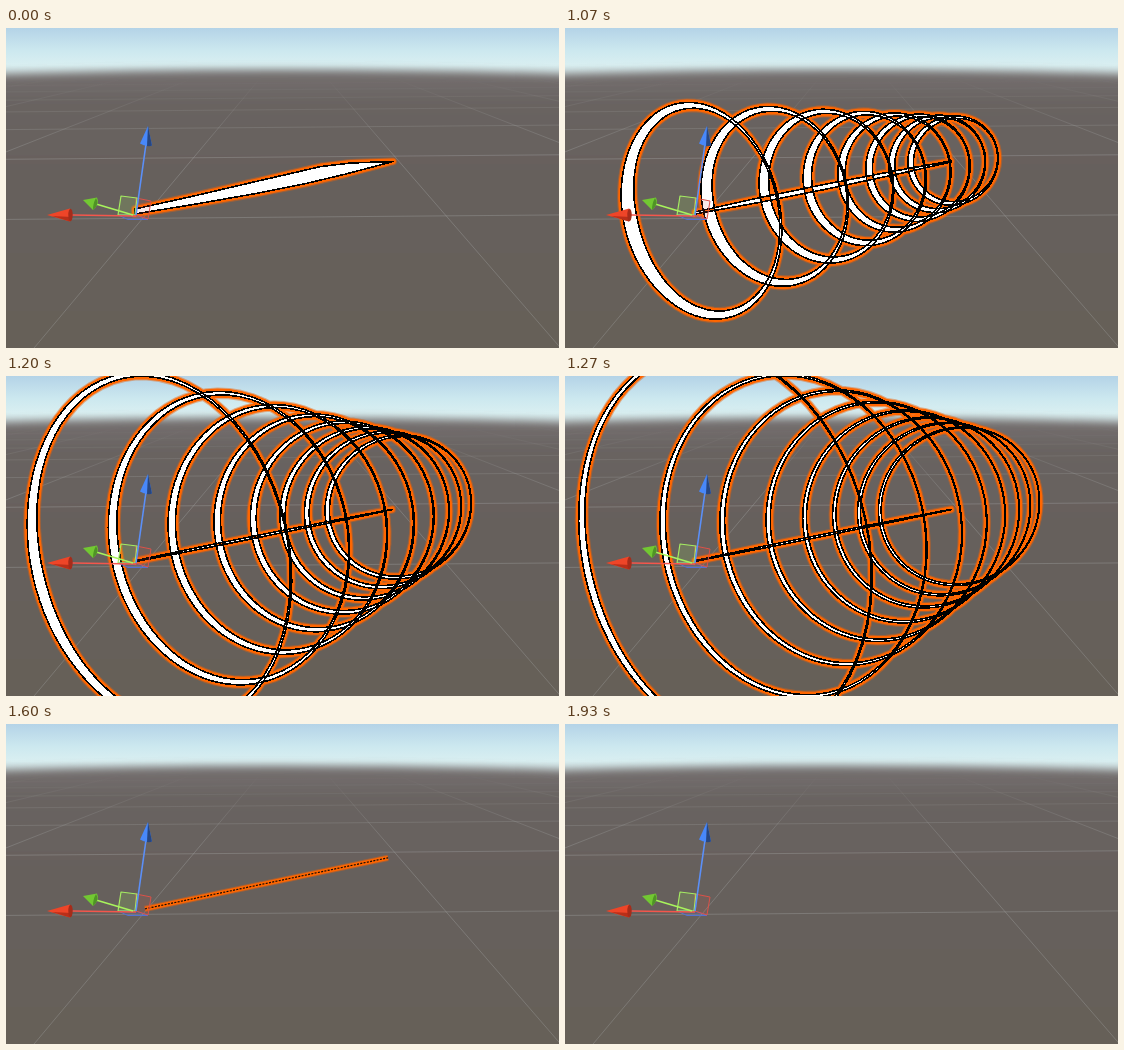
These frames come from a looping animation (553x320 px, 2.6 s). An HTML page:

```html
<!DOCTYPE html>
<html lang="en">
<head>
<meta charset="utf-8">
<title>Beam with expanding rings</title>
<style>
  html, body { margin: 0; width: 100%; height: 100%; overflow: hidden; background: #67625c; }
  svg { display: block; width: 100vw; height: 100vh; }
</style>
</head>
<body>
<svg viewBox="0 0 553 320" fill="none">
  <defs>
    <linearGradient id="sky" x2="0" y2="1">
      <stop stop-color="#b4d3e7"/>
      <stop offset=".4" stop-color="#cce8ef"/>
      <stop offset=".66" stop-color="#d9eff1"/>
      <stop offset="1" stop-color="#bcc4c5"/>
    </linearGradient>
    <linearGradient id="soil" gradientUnits="userSpaceOnUse" x1="0" y1="42" x2="0" y2="320">
      <stop stop-color="#757070"/>
      <stop offset=".12" stop-color="#696361"/>
      <stop offset=".4" stop-color="#66615c"/>
      <stop offset="1" stop-color="#666159"/>
    </linearGradient>
    <linearGradient id="fade" gradientUnits="userSpaceOnUse" x1="0" y1="50" x2="0" y2="320">
      <stop stop-color="#a3a5a4" stop-opacity="0"/>
      <stop offset=".12" stop-color="#a3a5a4" stop-opacity=".18"/>
      <stop offset=".3" stop-color="#a3a5a4" stop-opacity=".38"/>
      <stop offset="1" stop-color="#a3a5a4" stop-opacity=".34"/>
    </linearGradient>
    <filter id="haze" filterUnits="userSpaceOnUse" x="-40" y="0" width="640" height="400">
      <feGaussianBlur stdDeviation="4.5"/>
    </filter>
  </defs>

  <rect width="553" height="56" fill="url(#sky)"/>
  <path d="M-40 48Q276 36 593 48V380H-40Z" fill="url(#soil)" filter="url(#haze)"/>
  <path id="grid" stroke="url(#fade)"/>

  <g stroke-linejoin="round">
    <path id="glow" stroke="#e5600c" stroke-opacity=".45" stroke-width="8"/>
    <path id="outline" stroke="#ff6600" stroke-width="5.800"/>
    <path id="body" fill="#fff" stroke="#000" stroke-width="1.600" shape-rendering="crispEdges"/>
  </g>
  <g id="thread">
    <path id="threadGlow" stroke="#e5600c" stroke-opacity=".5"/>
    <path id="threadOrange" stroke="#ff6600"/>
    <path id="threadBlack" stroke="#100804"/>
    <path id="threadWhite" stroke="#fff" stroke-width="1.200" stroke-dasharray="5 4"/>
  </g>

  <g stroke-linejoin="round">
    <path d="M112 187H130L142 191.500H122Z" stroke="#5470d0" fill="#5470d0" fill-opacity=".2"/>
    <path d="M130 170L145 173L142 191L130 187Z" stroke="#dc5148" fill="#dc5148" fill-opacity=".12"/>
    <path d="M115 168L131 170L129 187H112Z" stroke="#a5ec62" stroke-width="1.200" fill="#a5ec62" fill-opacity=".16"/>
    <path d="M130 187L140 116" stroke="#5b8ff8" stroke-width="1.600"/>
    <path d="M142 98L134 115.500Q139 119 146 117.500Z" fill="#4888fa"/>
    <path d="M142 98L141 118Q144 118.500 146 117.500Z" fill="#274680"/>
    <path d="M130 188L66 187" stroke="#f4564c" stroke-width="1.500"/>
    <path d="M41 187L64 180.500Q68 187 64 193.500Z" fill="#ee4528"/>
    <path d="M46 188L66 189L64 193.500Z" fill="#b92f19"/>
    <ellipse cx="64.500" cy="187" rx="2.200" ry="6.200" fill="#a62c1a"/>
    <path d="M127 187L90 176" stroke="#a8f45c" stroke-width="1.500"/>
    <path d="M77 172L91 169.500Q94 176 87 182Z" fill="#72c832"/>
    <path d="M90 170Q94 176 87 182Q87 175 90 170Z" fill="#4f9426"/>
  </g>
</svg>

<script>
const LOOP = 2600, BURST = 1000, STEP = 66.66;
const RINGS = 8, SEGMENTS = 72;
const BLADE = 'M129 181L190 167.500L250 153.500L315 138.500L345 135L387 133.500' +
              'L340 146L300 155.500L250 165.500L190 176L129 186Z';
const el = id => document.getElementById(id);
const set = (id, attrs) => {
  for (const name in attrs) el(id).setAttribute(name, attrs[name]);
};
const polygon = points =>
  'M' + points.map(p => p.map(v => v.toFixed(1)).join(' ')).join('L') + 'Z';

function gridPath() {
  let d = '';
  for (let k = 1; k < 8; k++) {
    const y = 12 + 346 / (k + 0.95);
    d += `M0 ${y + 2}L553 ${y - 2.5}`;
  }
  for (let k = -4; k < 6; k++) {
    const slope = (137 + 305 * k - 287) / 179;
    d += `M${287 + slope * 39} 50L${287 + slope * 309} 320`;
  }
  return d;
}

// Rings lie in planes along the beam; the right and top of each ring are nearer to the viewer.
function ringPath(index, radius, band) {
  const depth = 1 + 0.2104 * index;
  const dx = 90.8 * index / depth, dy = -19 * index / depth;
  const cx = 130 + dx, cy = 187 + dy;
  const nearX = 0.057, nearY = 0.02;
  const ux = 32.5 + nearX * dx, uy = nearX * dy;
  const vx = -6 + nearY * dx, vy = -45.5 + nearY * dy;
  const outer = [], inner = [];
  for (let i = 0; i < SEGMENTS; i++) {
    const a = i / SEGMENTS * Math.PI * 2;
    const c = Math.cos(a), s = Math.sin(a);
    const scale = radius / (depth - radius * (nearX * c + nearY * s));
    const x = (ux * c + vx * s) * scale, y = (uy * c + vy * s) * scale;
    const half = band / depth * (0.28 - 0.22 * Math.cos(a - 0.2)) / Math.hypot(x, y);
    outer.push([cx + x * (1 + half), cy + y * (1 + half)]);
    inner.push([cx + x * (1 - half), cy + y * (1 - half)]);
  }
  return polygon(outer) + polygon(inner.reverse());
}

function beamPath(half) {
  const profile = [[0, 0.4], [0.25, 0.9], [0.5, 1], [0.8, 0.7], [1, 0.2]];
  const edge = side => profile.map(([f, h]) => [130 + 256 * f, 185 - 51.5 * f + side * h * half]);
  return polygon([...edge(-1), ...edge(1).reverse()]);
}

function burstPath(step) {
  const radius = 5 - 4 * 0.68 ** step;
  const band = [8.5, 14, 17, 11, 7][step];
  let d = '';
  for (let i = RINGS - 1; i >= 0; i--) d += ringPath(i, radius, band);
  return d + beamPath([4, 2.6, 1.6, 1.2, 1][step]);
}

function drawThread(step) {
  const age = step - 5;
  const start = 131 + Math.min(age * 2, 9), end = 384 - age * 0.5;
  const yAt = x => 186.5 - (x - 131) * 0.21;
  const d = `M${start} ${yAt(start)}L${end} ${yAt(end)}`;
  const gaps = age > 4 ? `${34 - age * 3} ${(age - 4) * 3}` : 'none';
  const width = Math.max(3, 6 - age * 0.4);
  set('threadGlow', { d, 'stroke-width': width + 2, 'stroke-dasharray': gaps });
  set('threadOrange', { d, 'stroke-width': width, 'stroke-dasharray': gaps });
  set('threadBlack', {
    d,
    'stroke-width': Math.max(0.7, 2.2 - age * 0.25),
    'stroke-dasharray': age > 1 ? `${Math.max(1, 6 - age)} ${age / 3}` : 'none'
  });
  set('threadWhite', { d, 'stroke-opacity': Math.max(0, 0.85 - age * 0.25) });
}

function render(time) {
  const t = time % LOOP;
  const step = t < BURST ? -1 : Math.floor((t - BURST + 3.4) / STEP);
  const d = step < 0 ? BLADE : step < 5 ? burstPath(step) : '';
  for (const id of ['glow', 'outline', 'body']) set(id, { d });
  const threadVisible = step >= 5 && step < 14;
  set('thread', { visibility: threadVisible ? 'visible' : 'hidden' });
  if (threadVisible) drawThread(step);
}

set('grid', { d: gridPath() });
const begin = performance.now();
function tick() {
  render(performance.now() - begin);
  requestAnimationFrame(tick);
}
tick();
</script>
</body>
</html>
```
